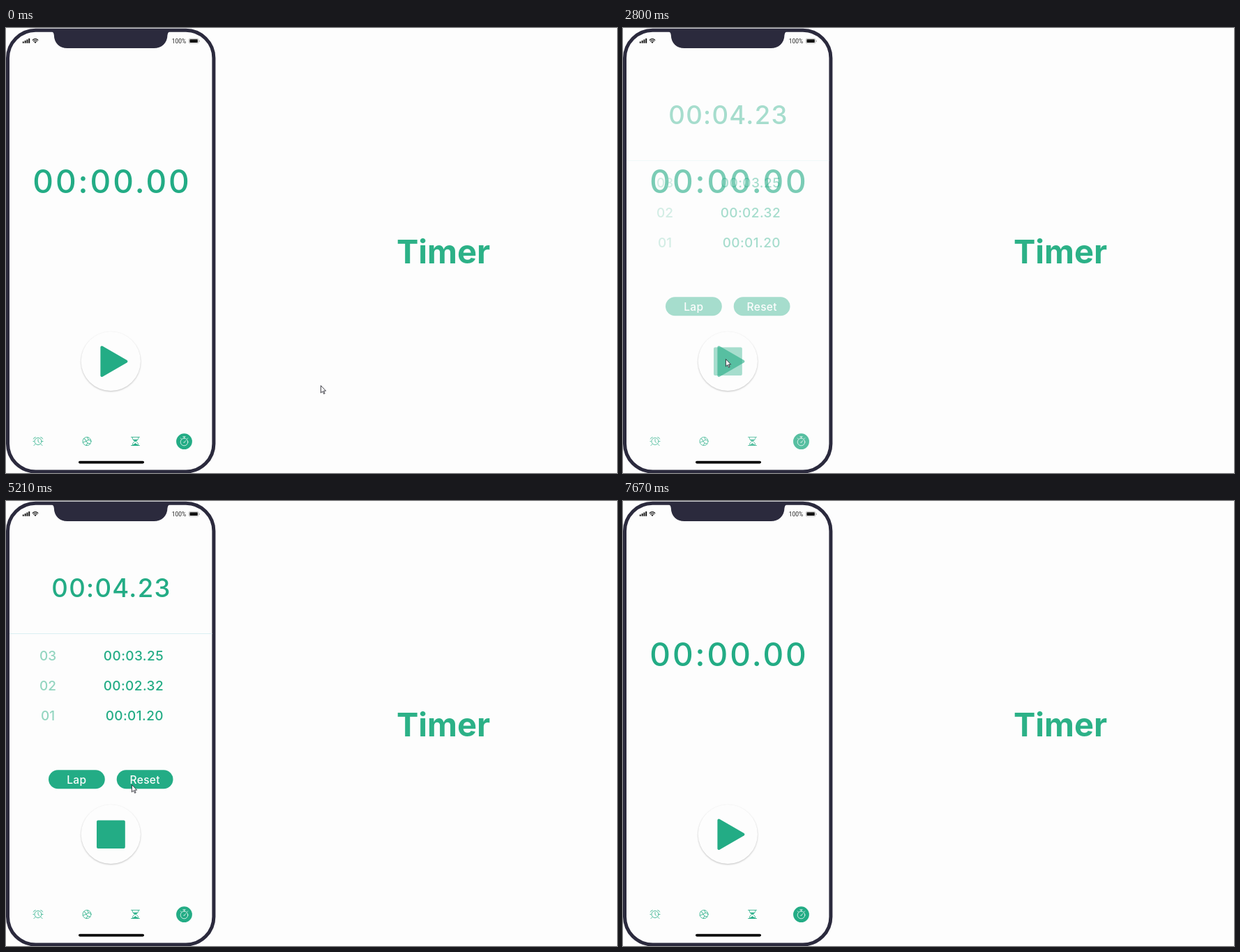
Write an HTML page that moves like this. It is 876x639 px and loops after 7.75 s.

```html
<!DOCTYPE html>
<html lang="en">
<head>
<meta charset="utf-8">
<title>Timer</title>
<style>
  html, body { margin: 0; width: 100%; height: 100%; overflow: hidden; background: #fdfdfd; }
  svg { display: block; }
  text { font-family: Inter, "Open Sans", sans-serif; font-weight: 500; fill: var(--green); }
  :root { --green: #23ac85; --bezel: #2b2a3d; }
  .mid { text-anchor: middle; }
  .end { text-anchor: end; }
  .big { font-size: 46px; letter-spacing: 3px; }
  .total { font-size: 36.5px; letter-spacing: 1.3px; }
  .lap { font-size: 19px; letter-spacing: .4px; }
  .index { font-size: 19px; fill: #93d5c0; }
  .label { font-size: 15.5px; letter-spacing: .3px; fill: #fdfdfd; }
  .title { font-size: 47px; font-weight: 700; fill: #2cb187; }
  .status { font: 400 8.4px Roboto, Arial, sans-serif; fill: #222; }
  .fill { fill: var(--green); }
  .icon { fill: none; stroke: var(--green); stroke-width: .8; stroke-linecap: round; stroke-linejoin: round; }
  .ring { fill: #fdfdfd; filter: drop-shadow(.6px 1.2px 1.3px rgba(0, 0, 0, .24)); }
</style>
</head>
<body>
<svg width="876" height="639" viewBox="0 0 876 639">
  <defs>
    <g id="tabs">
      <g class="icon" transform="translate(46 593.5)">
        <circle r="5"/>
        <path d="M0-3V.4L2 2M-6.6-3.5Q-6-6-3.6-5.8M6.6-3.5Q6-6 3.6-5.8M-4 4L-6 6M4 4L6 6M-7 0H-6M6 0H7"/>
      </g>
      <g class="icon" transform="translate(116 593.5)">
        <circle r="6"/>
        <path d="M-4.5-4Q-1-3-1 0L-5.7 1.5M-1 0L2-2L1-5.8M2-2L5.6-1.5M-1 0L1 2.5L-1 5.8M1 2.5L4.8 3.6"/>
      </g>
      <g class="icon" transform="translate(185.5 593.5)">
        <path d="M-6-6H6M-6 6H6M-4.5-6Q-4.5-2-1 0Q-4.5 2-4.5 6M4.5-6Q4.5-2 1 0Q4.5 2 4.5 6"/>
        <path class="fill" d="M-2.8-2.2H2.8L0 0ZM-3.4 5.4L0 3L3.4 5.4Z"/>
      </g>
      <circle class="fill" cx="255.5" cy="593.7" r="11.4"/>
      <g class="icon" transform="translate(255.5 594.5)" style="stroke:#fdfdfd">
        <circle r="5.3"/>
        <path d="M-1.8-7.5H1.8M0-7.5V-5.5M4.2-4.6L5.2-5.6M-4.2-4.6L-5.2-5.6M0 .5L2.4-2M-.6.5H.4"/>
      </g>
    </g>
  </defs>

  <rect x="2.5" y="3.2" width="295.4" height="633.8" rx="40" fill="#fdfdfd" stroke="var(--bezel)" stroke-width="5"/>
  <path fill="var(--bezel)" d="M61 4Q68.5 4 68.8 10C69 22 77 29 88 29H212C223 29 231.3 22 231.5 10Q232 4 239 4Z"/>

  <g fill="#111">
    <path d="M23.8 19.5h1.9v2.3h-1.9zM26.7 18h1.9v3.8h-1.9zM29.5 16.6h1.9v5.2h-1.9zM32.3 15h1.9v6.8h-1.9z"/>
    <path d="M42 22L40.4 20.2Q42 19 43.6 20.2Z"/>
    <path d="M37.8 17.6Q42 13.8 46.2 17.6M39.2 19.2Q42 16.8 44.8 19.2" fill="none" stroke="#111" stroke-width="1.2"/>
    <rect x="262.3" y="15.3" width="13.6" height="6.8" rx="1.6" fill="none" stroke="#999" stroke-width=".6"/>
    <rect x="263.4" y="16.3" width="11.4" height="4.8" rx=".8"/>
    <rect x="276.6" y="17.5" width="1" height="2.4" rx=".5" fill="#999"/>
  </g>
  <text class="status" x="237.8" y="21.5">100%</text>
  <rect x="104" y="621.8" width="94" height="3.6" rx="1.8" fill="#000"/>
  <circle class="ring" cx="150.3" cy="478.5" r="42.6"/>

  <g id="idle">
    <text class="big mid" x="152" y="236.5">00:00.00</text>
    <path class="fill" stroke="var(--green)" stroke-width="4" stroke-linejoin="round" d="M137.4 458.6L172.4 478.8L137.4 499Z"/>
    <use href="#tabs"/>
  </g>

  <g id="running">
    <text class="total mid" x="151" y="138">00:04.23</text>
    <path d="M5 190.5H295.5" stroke="#dbeff3"/>
    <g id="laps"></g>
    <rect class="fill" x="61" y="386.3" width="80.8" height="27" rx="13.5"/>
    <rect class="fill" x="158.7" y="386.3" width="80.8" height="27" rx="13.5"/>
    <text class="label mid" x="101.3" y="405.8">Lap</text>
    <text class="label mid" x="199.2" y="405.8">Reset</text>
    <rect class="fill" x="130" y="458.4" width="40.8" height="40.6" rx="2"/>
    <use href="#tabs"/>
  </g>

  <text class="title mid" x="627" y="338">Timer</text>
  <path id="cursor" d="M.4.5V11L2.9 8.7L4.6 12.4L6.1 11.7L4.4 8.1H7.6Z" fill="#fff" stroke="#2a2a33" stroke-width=".9" stroke-linejoin="round"/>
</svg>

<script>
const LOOP = 7750;
const FADE = 300;
const PLAY_AT = 2680;
const RESET_AT = 5260;

// time, x, y of the pointer tip
const PATH = [
  [0, 451, 513], [600, 455, 513], [1510, 455, 513],
  [2000, 150, 422], [2110, 150, 422], [2400, 147, 475],
  [4500, 147, 475], [4900, 180, 407],
  [5690, 180, 407], [6460, 890, 440]
];

const $ = id => document.getElementById(id);
const clamp = v => Math.min(1, Math.max(0, v));
const smooth = v => v * v * (3 - 2 * v);

$("laps").innerHTML = [["03", "00:03.25"], ["02", "00:02.32"], ["01", "00:01.20"]]
  .map(([n, time], i) => {
    const y = 229 + i * 43;
    return `<text class="index mid" x="60" y="${y}">${n}</text>` +
           `<text class="lap end" x="226" y="${y}">${time}</text>`;
  }).join("");

function pointer(t) {
  const i = PATH.findIndex(p => p[0] > t);
  if (i < 0) return PATH[PATH.length - 1].slice(1);
  const [t0, x0, y0] = PATH[i - 1];
  const [t1, x1, y1] = PATH[i];
  const k = smooth((t - t0) / (t1 - t0));
  return [x0 + (x1 - x0) * k, y0 + (y1 - y0) * k];
}

function draw(t) {
  const run = clamp((t - PLAY_AT) / FADE) - clamp((t - RESET_AT) / FADE);
  $("idle").style.opacity = 1 - run;
  $("running").style.opacity = run;
  const [x, y] = pointer(t).map(Math.round);
  $("cursor").setAttribute("transform", `translate(${x} ${y})`);
}

const start = performance.now();
function tick() {
  draw((performance.now() - start) % LOOP);
  requestAnimationFrame(tick);
}
tick();
</script>
</body>
</html>
```
